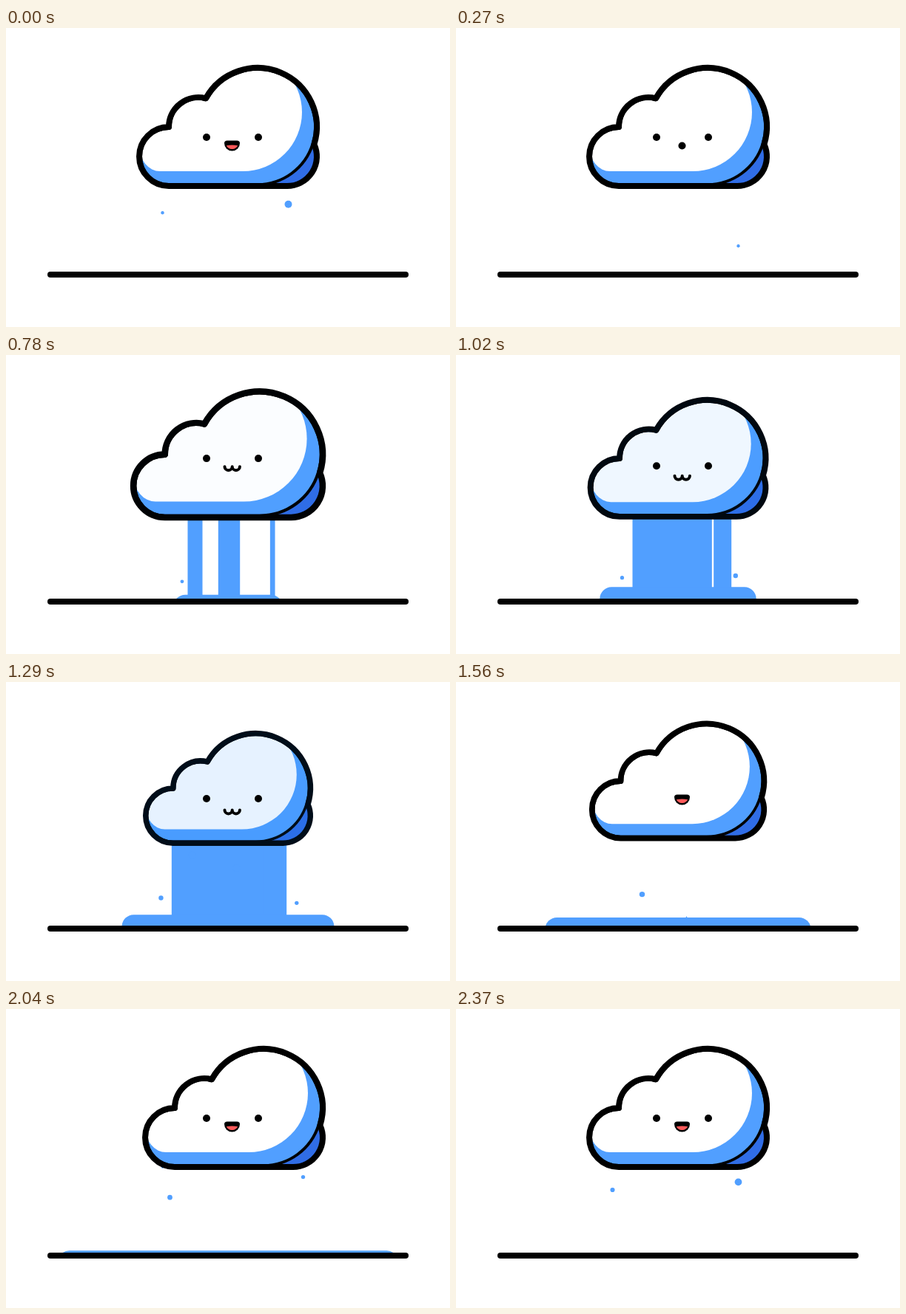
Recreate the animation shown at these times as an HTML page with a canvas. Size 600x405 px, loop 2.4 s.

```html
<!DOCTYPE html>
<html lang="en">
<head>
<meta charset="utf-8">
<title>Rain cloud</title>
<style>
  html, body { margin: 0; width: 100%; height: 100%; overflow: hidden; background: #fff; }
  canvas { display: block; }
</style>
</head>
<body>
<canvas id="stage" width="600" height="405"></canvas>
<script>
const LOOP = 2400, GROUND = 330, BLUE = '#519fff';
const SWELL = 265, POUR = 600, RELEASE = 1320;
const { PI, sin, cos, min, max } = Math;
const g = document.getElementById('stage').getContext('2d');

const bumps = 'M220 214A40 40 0 0 1 220 134A40 40 0 0 1 270 95.27A80 80 0 0 1 416.46 157.54';
const outline = new Path2D(bumps + 'A40 40 0 0 1 380 214Z');
const front = new Path2D(bumps + 'A80 80 0 0 1 340 214Z');
const light = new Path2D('M208 194H320A80 80 0 0 0 400 114A80 80 0 0 0 320 34H180V160A28 34 0 0 0 208 194Z');
const smile = new Path2D('M299 152.5H312Q316 152.5 316 156A10.5 10.5 0 0 1 295 156Q295 152.5 299 152.5Z');
const tongue = new Path2D('M297.8 159.3Q305.5 157.8 313.2 159.3A8.6 8.6 0 0 1 297.8 159.3Z');
const pout = new Path2D('M-10.2 -2.5a5.1 5 0 0 0 10.2 0a5.1 5 0 0 0 10.2 0');

let t = 0;

// Eased 0 to 1 while the clock runs from a to b
function ramp(a, b) {
  const u = min(max((t - a) / (b - a), 0), 1);
  return (1 - cos(PI * u)) / 2;
}

function ellipse(x, y, rx, ry = rx) {
  g.beginPath();
  g.ellipse(x, y, rx, ry, 0, 0, 2 * PI);
  g.fill();
}

function drawRain() {
  const foot = 200 + (GROUND - 200) * ramp(POUR, 680);
  const stay = 1 - ramp(1300, 1400);
  // centre, start time, widest
  for (const [x, start, limit] of [[255.5, 700, 34], [301.5, 662, 160], [360.2, 754, 24]]) {
    const w = min(max(0.247 * (t - start), 0), limit) * stay;
    g.fillRect(x - w / 2, 200, w, foot - 200);
  }
}

function drawPuddle() {
  const h = 16 * (ramp(POUR, 1060) - ramp(1060, LOOP));
  if (h <= 0) return;
  const w = 253 + 253 * sin((t - 1170) / 903);
  g.save();
  g.beginPath();
  g.rect(0, 0, 600, GROUND);
  g.clip();
  g.beginPath();
  g.roundRect(300 - w / 2, GROUND - h, w, 40, 16);
  g.fill();
  g.restore();
}

function drawDrops() {
  // x, birth, life
  const drops = [
    [311.5, 880, 720], [251.5, 989, 780], [221.5, 1613, 560],
    [401.5, 1795, 300], [211.5, 2000, 470], [381.5, 2070, 700]
  ];
  for (const [x, birth, life] of drops) {
    const age = (t - birth + LOOP) % LOOP;
    if (age < life) ellipse(x, 214 + 0.000225 * age * age, 5 * sin(PI * age / life));
  }
}

function drawSplashes() {
  for (let k = 0; k < 5; k++) {
    const u = (t - 690 - 115 * k) / 360;
    if (u <= 0 || u >= 1) continue;
    const reach = 59 + 6.5 * k + 18 * u;
    const rise = (28 + 2.3 * k) * 4 * u * (1 - u);
    ellipse(301.5 + (k % 2 ? reach : -reach), 328 - rise, 3.4 * sin(PI * u));
  }
}

function drawCloud(swell, rain, release) {
  const bounce = t < RELEASE ? 1 : max(0, 1 - (t - RELEASE) / 420) * cos((t - RELEASE) / 240 * 2 * PI);
  const scale = 1 + 0.09 * swell * (1 - rain) - 0.073 * rain * bounce;
  const x = 8 * (ramp(1840, 2040) - ramp(2040, 2240));
  const y = -swell + 11 * rain - 10 * release;
  const chill = 0.1 * rain * (1 - release);
  const tint = (...rgb) => `rgb(${rgb.map((c, i) => Math.round(c + ([0, 128, 255][i] - c) * chill))})`;

  g.save();
  g.translate(300 + x, 134 + y);
  g.scale(scale, scale);
  g.translate(-300, -134);
  g.lineWidth = 8;
  g.strokeStyle = tint(0, 0, 0);
  g.fillStyle = tint(48, 109, 230);
  g.fill(outline);
  g.save();
  g.clip(front);
  g.fillStyle = tint(81, 159, 255);
  g.fill(front);
  g.fillStyle = tint(255, 255, 255);
  g.fill(light);
  g.stroke(front);
  g.restore();
  g.stroke(outline);
  g.restore();
}

function drawFace(swell, rain, release) {
  const dy = -11 * swell + 21 * rain - 10 * release;
  const open = 1 - ramp(1490, 1540) + ramp(1580, 1630);
  g.fillStyle = g.strokeStyle = '#000';
  for (const x of [271, 341]) ellipse(x, 148 + dy, 5, 5 * open);

  g.save();
  if (t >= SWELL && t < POUR) {
    ellipse(305.5, 159.5, 5 + 8 * ramp(SWELL, 450));
  } else if (t >= POUR && t < 1400) {
    g.translate(305.7, 163.5 + 1.25 * dy);
    g.lineWidth = 4;
    g.stroke(pout);
  } else {
    g.translate(0, dy);
    g.fill(smile);
    g.fillStyle = '#ff5a5a';
    g.fill(tongue);
  }
  g.restore();
}

function draw() {
  const mood = [ramp(SWELL, POUR), ramp(POUR, RELEASE), ramp(RELEASE, 1440)];
  g.fillStyle = '#fff';
  g.fillRect(0, 0, 600, 405);
  g.lineCap = g.lineJoin = 'round';
  g.fillStyle = BLUE;
  drawRain();
  drawPuddle();
  drawDrops();
  drawSplashes();
  g.fillStyle = '#000';
  g.beginPath();
  g.roundRect(56, GROUND, 488, 8, 4);
  g.fill();
  drawCloud(...mood);
  drawFace(...mood);
}

const start = performance.now();
function tick() {
  t = (performance.now() - start) % LOOP;
  draw();
  requestAnimationFrame(tick);
}
tick();
</script>
</body>
</html>
```
